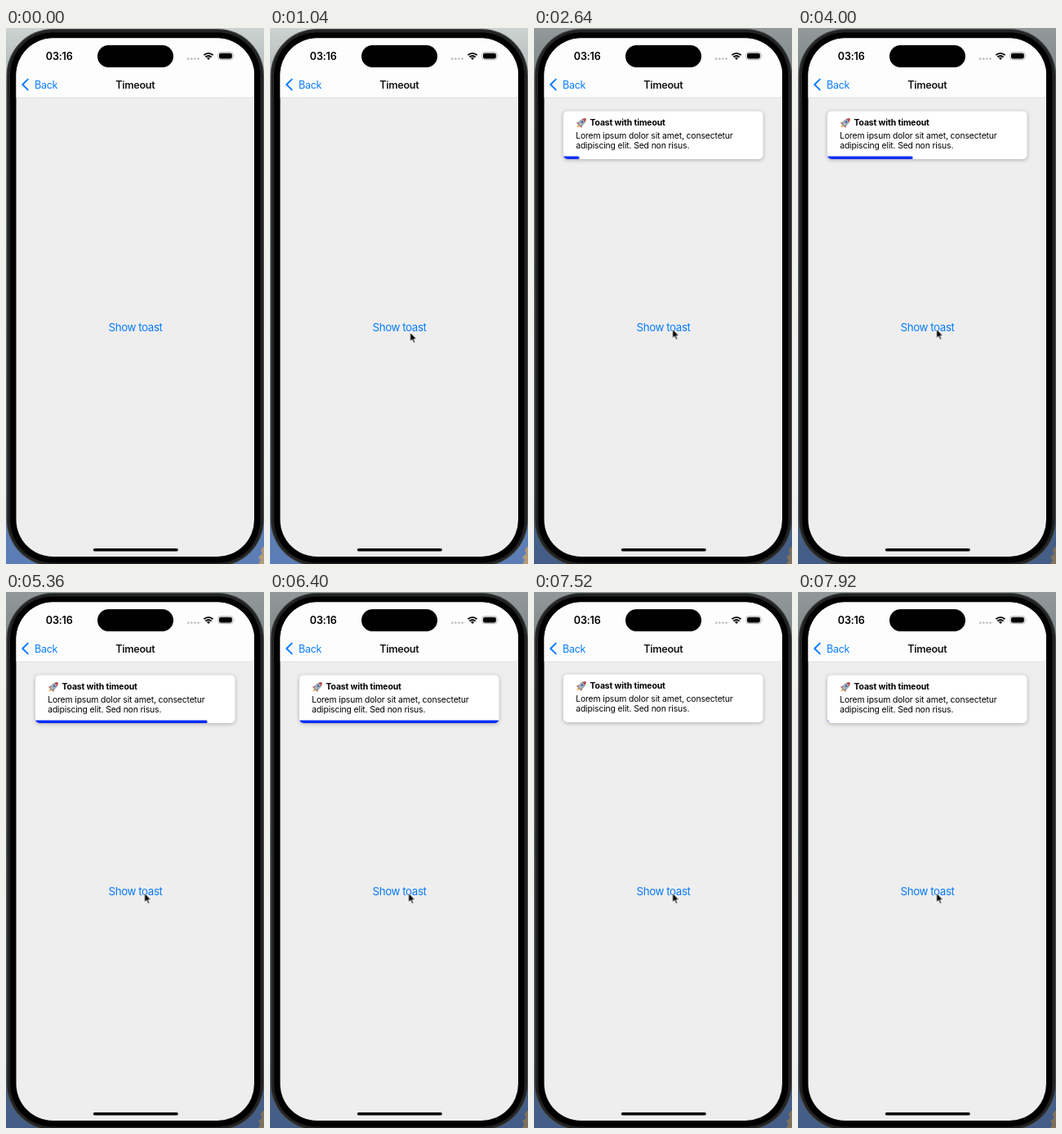
These frames come from a looping animation (316 px wide and 654 px high, 8 s). An HTML page:

```html
<!DOCTYPE html>
<html lang="en">
<head>
<meta charset="utf-8">
<title>Timeout toast</title>
<style>
  html, body { margin: 0; width: 100%; height: 100%; overflow: hidden; background: #000; }
  svg { display: block; width: 316px; height: 654px; }
  text { font-family: Inter, "Liberation Sans", sans-serif; white-space: pre; }
  .nav { font-size: 12.6px; letter-spacing: -.3px; }
  .semi { font-weight: 600; }
  .blue { fill: #087cff; }
  .body { font-size: 10.4px; letter-spacing: -.14px; }
  .title { font-size: 10.4px; font-weight: 700; letter-spacing: -.1px; }
  .card { filter: drop-shadow(0 1px 2.5px rgba(0, 0, 0, .28)); }
</style>
</head>
<body>
<svg viewBox="0 0 316 654">
  <defs>
    <linearGradient id="sky" x2="0" y2="1">
      <stop offset="0" stop-color="#ccd2d0"/>
      <stop offset=".12" stop-color="#a9b1b2"/>
      <stop offset=".8" stop-color="#6484b4"/>
      <stop offset="1" stop-color="#5b7db6"/>
    </linearGradient>
    <clipPath id="screen"><rect x="12.5" y="12.5" width="291.5" height="632.5" rx="45"/></clipPath>
    <clipPath id="content"><rect x="12" y="85.5" width="292" height="560"/></clipPath>
    <clipPath id="cardShape"><rect x="36" y="101.5" width="244.5" height="58.5" rx="5"/></clipPath>
  </defs>

  <!-- desktop -->
  <rect width="316" height="654" fill="url(#sky)"/>
  <path d="M316 632l-4 5 2 4-5 5 3 3-3 5h7z" fill="#b59a78"/>
  <rect id="shade" width="316" height="654" fill="#10141c" opacity="0"/>

  <!-- phone body -->
  <rect x=".5" y="1" width="315.5" height="656" rx="57" fill="#4a4c4c"/>
  <rect x="1.6" y="2" width="313.4" height="654" rx="56" fill="#222323"/>
  <rect x="5" y="5.5" width="306.5" height="647" rx="52" fill="#000"/>

  <g clip-path="url(#screen)">
    <rect x="12" y="12" width="293" height="634" fill="#eee"/>
    <text class="blue" x="158.5" y="370" text-anchor="middle" font-size="13.3" letter-spacing="-.4">Show toast</text>

    <g clip-path="url(#content)">
      <g id="toast">
        <rect class="card" x="36" y="101.5" width="244.5" height="58.5" rx="5" fill="#fff"/>
        <g clip-path="url(#cardShape)">
          <rect id="bar" x="36" y="156.6" width="244.5" height="3.6" rx="1.2" fill="#0a2df5"/>
        </g>
        <g transform="translate(58 115.8) rotate(45)">
          <path d="M-2.6 1L-4.6 4.4-2 3.7zM2.6 1L4.6 4.4 2 3.7z" fill="#c93a35"/>
          <path d="M-1.5 4H1.5L0 8z" fill="#f6a52b"/>
          <path d="M0-7.6C3.6-4.4 3.2 1 2 4.2H-2C-3.2 1-3.6-4.4 0-7.6z" fill="#a9b2bd" stroke="#59626e" stroke-width=".6"/>
          <path d="M0-7.6C1.3-6.5 2-5.4 2.3-4.3H-2.3C-2-5.4-1.3-6.5 0-7.6z" fill="#d33f39"/>
          <circle cy="-1.6" r="1.3" fill="#315f9c"/>
        </g>
        <text class="title" x="68.5" y="119.3">Toast with timeout</text>
        <text class="body" x="51.2" y="134.6">Lorem ipsum dolor sit amet, consectetur</text>
        <text class="body" x="51.2" y="147.4">adipiscing elit. Sed non risus.</text>
      </g>
    </g>

    <!-- header and status bar -->
    <rect x="12" y="12" width="293" height="73" fill="#fdfdfd"/>
    <rect x="12" y="84.6" width="293" height=".8" fill="#d9d9d9"/>
    <path d="M26.8 62.6L20.3 69l6.5 6.4" fill="none" stroke="#087cff" stroke-width="2" stroke-linecap="round" stroke-linejoin="round"/>
    <text class="nav blue" x="35" y="73.5">Back</text>
    <text class="nav semi" x="158.3" y="73.5" text-anchor="middle" fill="#161616">Timeout</text>
    <text class="nav semi" x="48.8" y="39" style="letter-spacing:-.2px">03:16</text>
    <rect x="112" y="21" width="93" height="27" rx="13.5"/>
    <g fill="#bdbdbd">
      <circle cx="223.2" cy="37.6" r="1.3"/><circle cx="227.3" cy="37.6" r="1.3"/>
      <circle cx="231.4" cy="37.6" r="1.3"/><circle cx="235.5" cy="37.6" r="1.3"/>
    </g>
    <g fill="none" stroke="#000" stroke-width="1.8">
      <path d="M242.4 33.1a8 8 0 0 1 11.2 0M244.4 35.5a5.1 5.1 0 0 1 7.2 0"/>
      <path d="M246 36.8a2.9 2.9 0 0 1 4 0L248 39z" fill="#000" stroke="none"/>
    </g>
    <rect x="259.8" y="29.6" width="18.2" height="9" rx="2.9" fill="none" stroke="#a6a6a6" stroke-width=".8"/>
    <rect x="261" y="30.8" width="15.8" height="6.6" rx="1.8"/>
    <path d="M279 32.6q1.4 1.5 0 3z" fill="#a6a6a6"/>
    <rect x="106.8" y="635" width="104" height="3.6" rx="1.8"/>
  </g>

  <g id="cursor">
    <path d="M0 0V11.2L2.6 8.8 4.4 13 6.3 12.2 4.5 8.1H8z" fill="#000" stroke="#fff" stroke-width=".9" stroke-linejoin="round"/>
  </g>
</svg>
<script>
const LOOP = 8000;
const ease = (a, b, c, d) => `cubic-bezier(${a},${b},${c},${d})`;
const HOLD = 'steps(1, end)';
const OUT = ease(.2, .7, .3, 1);
const IN = ease(.5, 0, 1, .7);
const move = (x, y) => ({ transform: `translate(${x}px, ${y}px)` });
const slide = y => move(0, y);
const fill = part => move(-244.5 * (1 - part), 0);
const show = opacity => ({ opacity });

// each row: time in ms, state, easing towards the next row
const tracks = {
  toast: [
    [0, slide(-80), HOLD],
    [1280, slide(-80), OUT],
    [1800, slide(0), HOLD],
    [6400, slide(0), IN],
    [6680, slide(-80), HOLD],
    [7120, slide(-80), OUT],
    [7640, slide(0), HOLD],
    [LOOP, slide(0)]
  ],
  bar: [
    [0, fill(0), HOLD],
    [1900, fill(0), ease(.33, 0, .67, .37)],
    [2640, fill(.078), ease(.33, .26, .67, .6)],
    [4000, fill(.426), ease(.33, .32, .67, .74)],
    [5360, fill(.86), ease(.33, .61, .67, 1)],
    [6400, fill(1), HOLD],
    [6700, fill(0), HOLD],
    [7740, fill(0), ease(.42, 0, 1, 1)],
    [LOOP, fill(.01)]
  ],
  cursor: [
    [0, move(320, 560), HOLD],
    [560, move(320, 560), OUT],
    [1000, move(171.6, 371.4), HOLD],
    [1060, move(171.6, 371.4), OUT],
    [1200, move(169.6, 367.4), HOLD],
    [LOOP, move(169.6, 367.4)]
  ],
  shade: [
    [0, show(0), HOLD],
    [1240, show(.3), HOLD],
    [LOOP, show(.3)]
  ]
};

for (const [id, rows] of Object.entries(tracks)) {
  const frames = rows.map(([time, state, easing = 'linear']) =>
    ({ ...state, offset: time / LOOP, easing }));
  const anim = document.getElementById(id).animate(frames, { duration: LOOP, iterations: Infinity });
  anim.startTime = document.timeline.currentTime;
}
</script>
</body>
</html>
```
